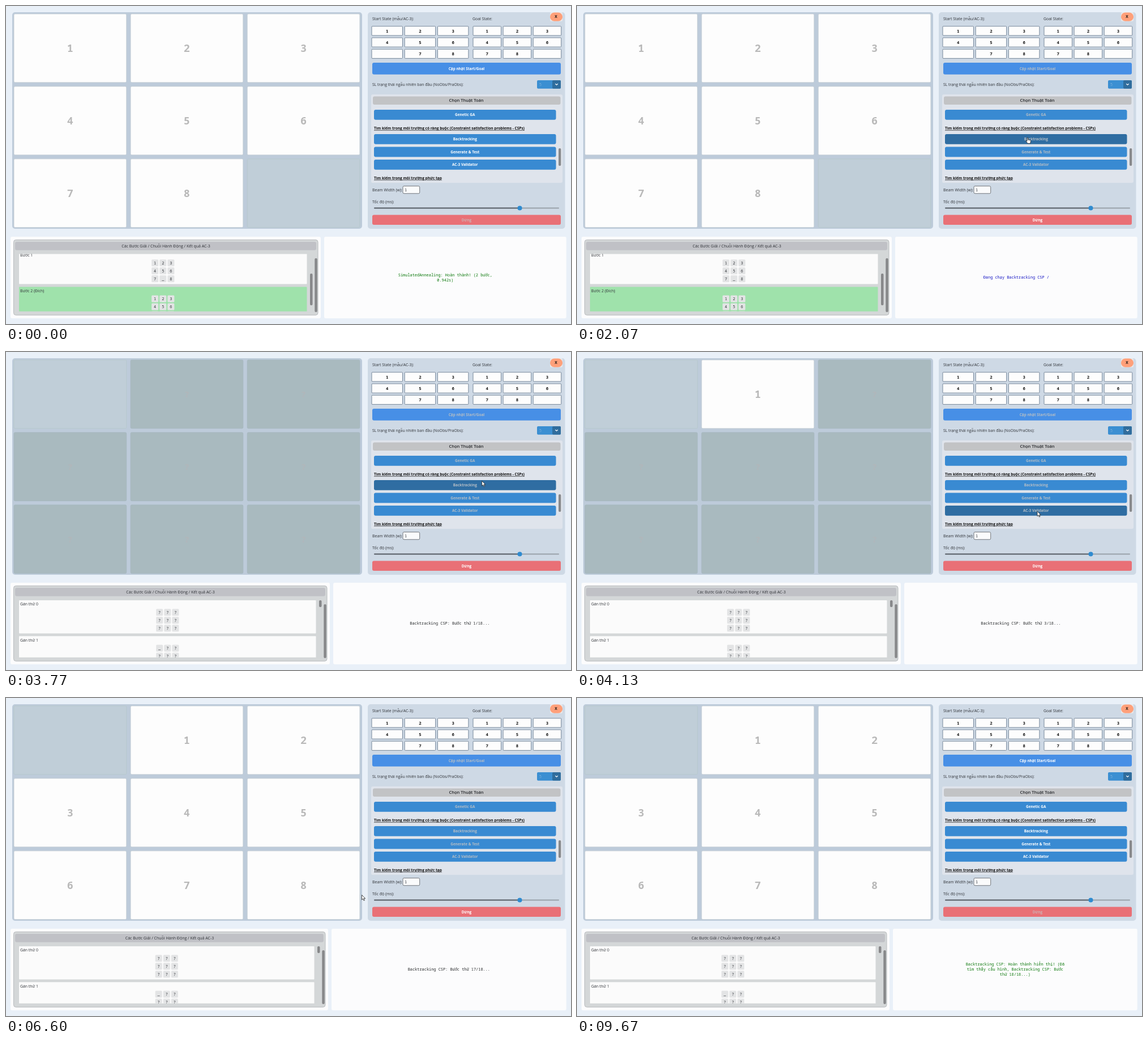
Recreate the animation shown at these times as an HTML page. Size 998x561 px, loop 9740 ms.

```html
<!DOCTYPE html>
<html lang="vi">
<head>
<meta charset="utf-8">
<title>8-Puzzle</title>
<style>
html, body { margin: 0; width: 100%; height: 100%; overflow: hidden; background: #e9f0f8; }
svg#stage { display: block; width: 100%; height: 100%; }
text { font-family: "Open Sans", "Noto Sans", sans-serif; white-space: pre; }
.mono { font-family: "Noto Sans Mono", "DejaVu Sans Mono", monospace; }
</style>
</head>
<body>
<svg id="stage" viewBox="0 0 998 561"></svg>
<script>
const LOOP = 9740, RUN = 1550, FOUND = 2700, FIRST = 3760, STEP = 170, DONE = FIRST + 18 * STEP;
const stage = document.getElementById('stage');

// Shapes: boxes go from corner to corner; text is placed by the middle of its capitals.
const box = (x1, y1, x2, y2, fill, r = 0, extra = '') =>
  `<rect x="${x1}" y="${y1}" width="${x2 - x1}" height="${y2 - y1}" rx="${r}" fill="${fill}" ${extra}/>`;
const text = (s, x, y, size, fill, extra = '') =>
  `<text x="${x}" y="${y + size * 0.357}" font-size="${size}" fill="${fill}" ${extra}>${s}</text>`;
const MID = 'text-anchor="middle"', BOLD = 'font-weight="700"', MONO = 'class="mono"';
const stroke = (c, w = 1) => `stroke="${c}" stroke-width="${w}"`;
const INK = '#303338', DIM = '#b4bdc5';

// Pointer: time, x, y
const PATH = [
  [850, 760, 565], [1450, 795, 233], [2250, 795, 233], [2650, 996, 4], [2800, 996, 4],
  [3080, 937, 41], [3250, 937, 41], [4000, 813, 281], [4300, 813, 281], [5400, 643, 325],
  [6300, 643, 325], [7450, 557.5, 457], [7900, 557.5, 457], [8650, 1000, 420]
];
function pointer(t) {
  const i = PATH.findIndex(p => p[0] > t);
  if (i < 1) return null;
  const [a, b] = [PATH[i - 1], PATH[i]];
  const k = (t - a[0]) / (b[0] - a[0]), e = k * k * (3 - 2 * k);
  return { x: a[1] + (b[1] - a[1]) * e, y: a[2] + (b[2] - a[2]) * e };
}
function drawPointer(p, hand) {
  if (!p) return '';
  const d = hand
    ? 'M0 0c0-1.4 1.7-1.4 1.7 0v3l4 .8q1 .3.8 1.5l-.8 4.2h-4.5l-3-3.8q-.5-1.2.8-1l1 .9z'
    : 'M0 0v8.6l2-1.8 1.5 3.2 1.4-.6-1.5-3.1h2.8z';
  return `<path transform="translate(${p.x} ${p.y})" d="${d}" fill="#fff" ${stroke('#222', 0.8)}/>`;
}

function stateAt(t) {
  if (t < FOUND) {
    const running = t >= RUN;
    const spin = '|/-\\'[Math.floor((t - RUN) / 100) & 3];
    return {
      running, board: '12345678_', split: 562, scroll: 69.2, bar: [472, 528],
      list: [['Bước 0', '123456_78'], ['Bước 1', '1234567_8'], ['Bước 2 (Đích)', '12345678_']],
      color: running ? '#1414c4' : '#0b780b',
      status: running ? ['Đang chạy Backtracking CSP ' + spin]
        : ['SimulatedAnnealing: Hoàn thành! (2 bước,', '0.942s)']
    };
  }
  const s = { running: t < DONE, scroll: 0, bar: [438, 450], color: '#26282a' };
  if (t < FIRST) return {
    ...s, board: '?????????', split: 593, list: [['Bước 0', ''], ['Bước 1', '']],
    status: ['Backtracking CSP: Tìm thấy cấu hình! (18', 'bước thử, 0.000s). Bắt đầu hiển thị...']
  };
  const n = Math.min(18, Math.floor((t - FIRST) / STEP) + 1);
  s.board = '_12345678'.slice(0, (n + 1) >> 1).padEnd(9, '?');
  s.list = [['Gán thử 0', '?????????'], ['Gán thử 1', '_????????']];
  if (s.running) return {
    ...s, split: n < 10 ? 578 : 575, status: [`Backtracking CSP: Bước thử ${n}/18...`]
  };
  return {
    ...s, split: 558, color: '#0b780b',
    status: ['Backtracking CSP: Hoàn thành hiển thị! (Đã', 'tìm thấy cấu hình, Backtracking CSP: Bước', 'thử 18/18...)']
  };
}

function drawBoard(board) {
  let out = box(11, 11, 629, 393, '#bdcbda', 5);
  [...board].forEach((c, i) => {
    const x = 14 + (i % 3) * 206.1, y = 14 + Math.floor(i / 3) * 127.9;
    const fill = c === '?' ? '#a9babf' : c === '_' ? '#c0ced8' : '#fdfdfd';
    const edge = c === '?' ? '#a4b5bd' : c === '_' ? '#b5c8c9' : '#c6cfd5';
    out += box(x, y, x + 198.7, y + 120.8, fill, 2, stroke(edge, 0.8));
    if (c !== '_') out += text(c, x + 99.3, y + 60.4, c === '?' ? 15 : 18.5,
      c === '?' ? '#b1b6ba' : '#b9b9b9', `${MID} ${MONO} ${BOLD}`);
  });
  return out;
}

function inputs(x, pitch, w, digits) {
  return [...digits].map((c, i) => {
    const l = x + (i % 3) * pitch, y = 35.8 + Math.floor(i / 3) * 20.2;
    return box(l, y, l + w, y + 16.2, '#fdfdfd', 1, stroke('#76879a')) +
      text(c === '_' ? '' : c, l + w / 2, y + 8.1, 7.4, '#111', `${MID} ${MONO} ${BOLD}`);
  }).join('');
}

function button(label, x1, y1, x2, y2, fill, color) {
  return box(x1, y1, x2, y2, fill, 3) +
    text(label, (x1 + x2) / 2, (y1 + y2) / 2, 6.45, color, `${MID} ${BOLD}`);
}

function drawControls(running, p, caret) {
  const label = running ? DIM : '#fff';
  const heading = (s, y) => text(s, 650, y, 6.55, '#111', `${BOLD} text-decoration="underline"`);
  let out = box(639, 11, 987.5, 393, '#ced9e5', 5) +
    box(961, 11, 983, 27, '#e8e8ea', 2) + box(961, 11.5, 983, 26.8, '#ffa07a', 7.6) +
    text('X', 971.5, 19, 6.6, '#111', `${MID} ${BOLD}`) +
    text('Start State (mẫu/AC-3):', 647, 23, 6.95, INK) + text('Goal State:', 824, 23, 6.95, INK) +
    inputs(646, 58.2, 54.5, '123456_78') + inputs(825, 53.1, 49.5, '12345678_');
  if (caret) out += box(733, 79, 734, 89.5, '#111');
  out += button('Cập nhật Start/Goal', 647, 100, 980, 120.7, '#478fe6', label) +
    text('SL trạng thái ngẫu nhiên ban đầu (NoObs/PraObs):', 647, 138.5, 6.85, INK) +
    box(938, 131, 980, 145.7, '#3b8fd2', 2) + box(965, 131, 980, 145.7, '#306d9d', 2) +
    text('5', 942, 138.5, 6.9, '#7fb2dc') +
    `<path d="M970.3 137.3l2.2 2 2.2-2" fill="none" ${stroke('#fff', 1.2)}/>` +
    box(645, 156, 983, 312, '#dfe4ec', 3) + box(648, 159.5, 979.5, 174, '#c2c3c5', 3) +
    text('Chọn Thuật Toán', 813, 166.8, 7.5, '#26282c', `${MID} font-weight="600"`);
  [['Genetic GA', 183], ['Backtracking', 226], ['Generate &amp; Test', 248.5], ['AC-3 Validator', 271]]
    .forEach(([name, y]) => {
      const hover = p && p.x > 650 && p.x < 971 && p.y > y && p.y < y + 17.7;
      out += button(name, 650, y, 971.5, y + 17.7, hover ? '#2f6da2' : '#398ad2', label);
    });
  return out +
    heading('Tìm kiếm trong môi trường có ràng buộc (Constraint satisfaction problems - CSPs)', 215.6) +
    heading('Tìm kiếm trong môi trường phức tạp', 303.4) +
    box(976, 251, 980.3, 282, '#88898c', 2) +
    text('Beam Width (w):', 647, 324.3, 6.95, INK) +
    box(701, 317.7, 730.7, 330.8, '#fafbfc', 2, stroke('#73777c')) +
    text('1', 704, 324.3, 6.9, INK, MONO) +
    text('Tốc độ (ms):', 647, 345.3, 6.95, INK) +
    box(650, 355.5, 907, 357.5, '#555b62', 1) + box(907, 355.5, 977, 357.5, '#9aa1a9', 1) +
    `<circle cx="907.5" cy="356.4" r="4" fill="#2f8bd0"/>` +
    button('Dừng', 647, 368.5, 980, 386, '#e97076', running ? '#fff' : '#ceb0b3');
}

function drawSteps({ split, list, scroll, bar }) {
  const right = split - 30.5, mid = (23 + right) / 2;
  let out = box(8, 407, split - 6, 551, '#fcfcfd', 3) +
    box(13.5, 412.5, split - 11, 545.3, '#d4d7d8', 4, stroke('#b9bcbe')) +
    box(16, 416, split - 14, 430.7, '#c0c1c6', 3) +
    text('Các Bước Giải / Chuỗi Hành Động / Kết quả AC-3', (split + 3) / 2, 423.4, 7, INK, MID) +
    `<svg x="0" y="437.6" width="998" height="101.2" viewBox="0 437.6 998 101.2">`;
  list.forEach(([name, cells], i) => {
    const y = 438 + i * 63.3 - scroll;
    out += box(23, y, right, y + 58.5, name.includes('Đích') ? '#9fe2ab' : '#fbfbfb', 1) +
      text(name, 25, y + 7, 6.9, INK);
    [...cells].forEach((c, j) => {
      const cx = mid + (j % 3 - 1) * 14.1, cy = y + 21.2 + Math.floor(j / 3) * 14;
      out += box(cx - 6, cy - 6, cx + 6, cy + 6, '#e3e4e5', 1.5) +
        text(c, cx, cy, 6.9, INK, `${MID} ${MONO}`);
    });
  });
  return out + '</svg>' +
    box(split - 25, bar[0], split - 20.5, bar[1], '#87888a', 2) +
    box(split - 16.7, 445, split - 12.2, 540, '#87888a', 2);
}

function drawStatus({ split, status, color }) {
  return box(split, 407, 989.7, 551, '#fcfcfd', 3) + status.map((line, i) =>
    text(line, (split + 989.7) / 2, 479 + (i - (status.length - 1) / 2) * 9, 6.93, color, `${MID} ${MONO}`)
  ).join('');
}

let shown = '';
function frame(now) {
  const t = now % LOOP, s = stateAt(t), p = pointer(t);
  const caret = t > DONE && Math.floor((t - 6670) / 530) % 2 === 0;
  const hand = p && t < FOUND && p.x > 650 && p.x < 971 && p.y > 226 && p.y < 244;
  const html = drawBoard(s.board) + drawControls(s.running, p, caret) +
    drawSteps(s) + drawStatus(s) + drawPointer(p, hand);
  if (html !== shown) stage.innerHTML = shown = html;
  requestAnimationFrame(() => frame(performance.now()));
}
frame(0);
</script>
</body>
</html>
```
